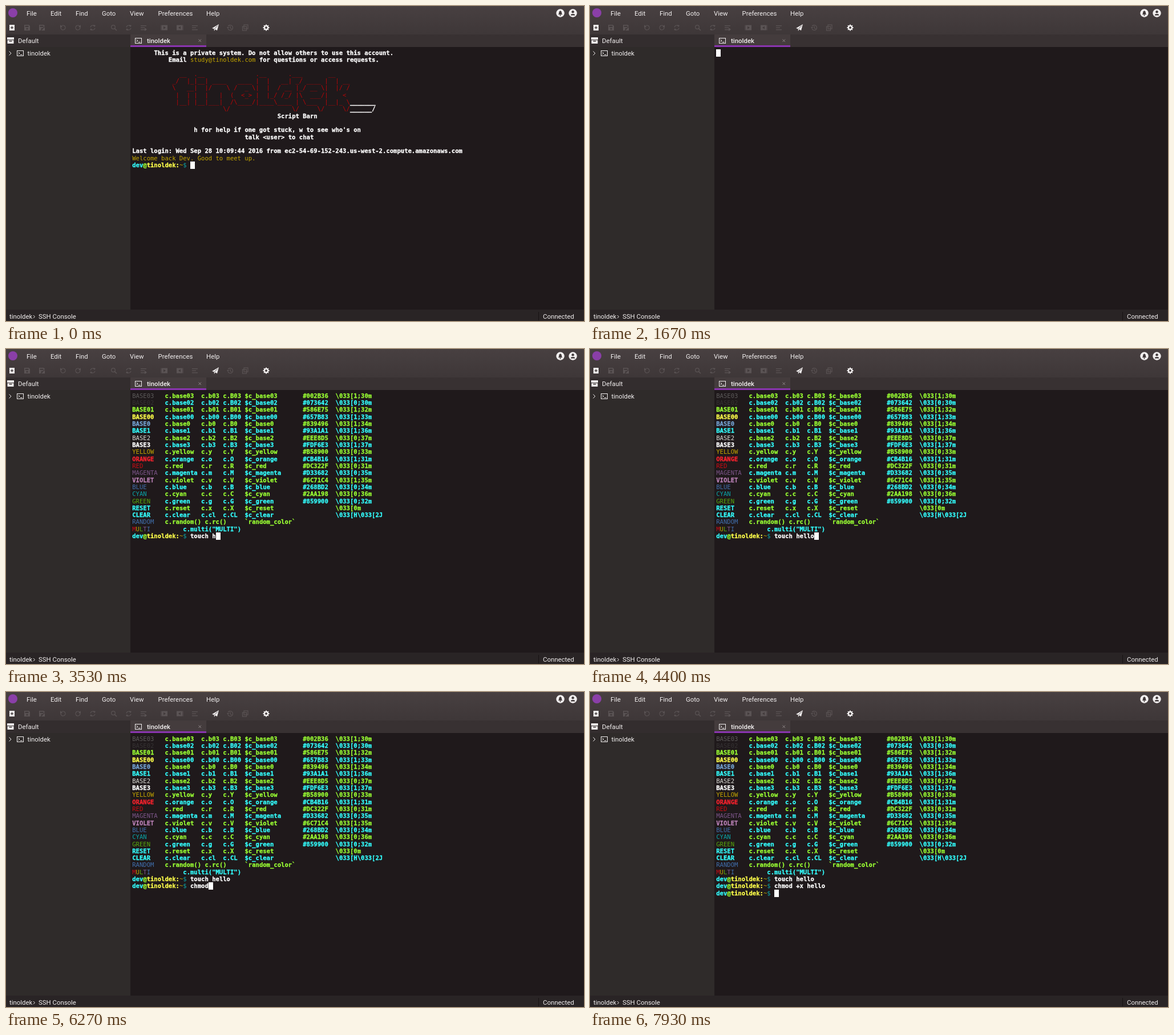
Recreate the animation shown at these times as an HTML page with a canvas. Size 1013 by 553 pixels, loop 8000 ms.

```html
<!DOCTYPE html>
<html lang="en">
<head>
<meta charset="utf-8">
<title>Terminal session</title>
<style>
html, body { margin: 0; width: 100%; height: 100%; overflow: hidden; background: #1f191b; }
canvas { display: block; width: 1013px; height: 553px; }
</style>
</head>
<body>
<canvas id="stage"></canvas>
<script>
const W = 1013, H = 553, LOOP = 8000;
const canvas = document.getElementById('stage');
const ctx = canvas.getContext('2d');
const ratio = window.devicePixelRatio || 1;
canvas.width = W * ratio;
canvas.height = H * ratio;

const HOST = 'tinoldek', USER = 'dev';
const LEFT = 221.2, TOP = 82, CELL = 6.363, LINE = 12.32;
const MONO = '10.57px "DejaVu Sans Mono", monospace';
const SANS = '11.4px Roboto, sans-serif';
const C = {
  white: '#ffffff', grey: '#dcdcd6', green: '#99ff33', cyan: '#33ffff', yellow: '#ffff4a',
  gold: '#c4a600', teal: '#0aa5a8', red: '#cc0c14', blue: '#4070ae', purple: '#7d568a', leaf: '#58a80c'
};
const LIT = '#f2efef', DIM = '#5a5354', BAR = '#413a3b';

// ---- basic drawing helpers

function rect(x, y, w, h, color) {
  ctx.fillStyle = color;
  ctx.fillRect(x, y, w, h);
}

function disc(x, y, r, color) {
  ctx.fillStyle = color;
  ctx.beginPath();
  ctx.arc(x, y, r, 0, Math.PI * 2);
  ctx.fill();
}

function arc(x, y, r, from, to, color, width = 1.2) {
  ctx.strokeStyle = color;
  ctx.lineWidth = width;
  ctx.beginPath();
  ctx.arc(x, y, r, from, to);
  ctx.stroke();
}

function line(points, color, width = 1.2) {
  ctx.strokeStyle = color;
  ctx.lineWidth = width;
  ctx.beginPath();
  for (let i = 0; i < points.length; i += 2) ctx.lineTo(points[i], points[i + 1]);
  ctx.stroke();
}

function poly(points, color) {
  ctx.fillStyle = color;
  ctx.beginPath();
  for (let i = 0; i < points.length; i += 2) ctx.lineTo(points[i], points[i + 1]);
  ctx.fill();
}

function label(text, x, y, weight = 400, color = LIT) {
  ctx.font = weight + ' ' + SANS;
  ctx.fillStyle = color;
  ctx.fillText(text, x, y);
}

function put(row, col, text, color = C.white, weight = 'bold') {
  const x = LEFT + col * CELL, y = TOP + row * LINE + 3.7;
  ctx.font = weight + ' ' + MONO;
  ctx.fillStyle = color;
  ctx.fillText(text, x, y);
  if (weight !== 'bold') return;
  ctx.strokeStyle = color;
  ctx.lineWidth = 0.3;
  ctx.strokeText(text, x, y);
}

const thin = (row, col, text, color) => put(row, col, text, color, 'normal');

function cursor(row, col) {
  rect(Math.round(LEFT + col * CELL), Math.round(TOP + row * LINE - 6.5), 8, 13, '#ffffff');
}

// ---- window frame

function shellIcon(x, y) {
  ctx.strokeStyle = LIT;
  ctx.lineWidth = 1;
  ctx.strokeRect(x + 0.5, y + 0.5, 11, 9);
  line([x + 2.5, y + 3, x + 5, y + 5, x + 2.5, y + 7], LIT, 1);
  line([x + 6, y + 7.5, x + 9.5, y + 7.5], LIT, 1);
}

function floppy(x) {
  poly([x - 5, 33, x + 3, 33, x + 5, 35, x + 5, 43, x - 5, 43], DIM);
  rect(x - 3.5, 34.5, 6, 2.5, BAR);
  disc(x, 40, 1.6, BAR);
}

function turn(x, dir) {
  arc(x, 38, 4, -2.4, 2.4, DIM);
  if (dir < 0) {
    arc(x, 38, 4, 2.4, 3.6, DIM);
    poly([x - 5, 33, x - 5, 37, x - 1, 37], DIM);
  } else {
    arc(x, 38, 4, 2, 4.4, DIM);
    poly([x + 5, 33, x + 5, 37, x + 1, 37], DIM);
  }
}

function sync(x) {
  arc(x, 38, 4, 3.3, 5.6, DIM);
  arc(x, 38, 4, 0.2, 2.5, DIM);
  poly([x + 1, 33, x + 5, 34, x + 3, 37], DIM);
  poly([x - 1, 43, x - 5, 42, x - 3, 39], DIM);
}

function indent(x, dir) {
  rect(x - 5, 33.5, 10, 9, DIM);
  poly([x - 2 * dir, 35.5, x + 2 * dir, 38, x - 2 * dir, 40.5], BAR);
  rect(x - dir * 6 - 0.5, 33.5, 1, 9, DIM);
}

function bars(x) {
  for (const [y, w] of [[34, 10], [37.5, 7], [41, 10]]) rect(x - 5, y, w, 1.3, DIM);
}

function gear(x, y) {
  for (let i = 0; i < 8; i++) {
    const a = i * Math.PI / 4;
    line([x, y, x + Math.cos(a) * 5.5, y + Math.sin(a) * 5.5], LIT, 2);
  }
  disc(x, y, 4.2, LIT);
  disc(x, y, 1.9, BAR);
}

function toolbar() {
  rect(6, 33, 9, 10, LIT);
  line([8, 38, 13, 38], BAR, 1.4);
  line([10.5, 35.5, 10.5, 40.5], BAR, 1.4);
  floppy(37);
  floppy(63);
  line([61, 43, 68, 36], BAR, 1.3);
  turn(100, -1);
  turn(126, 1);
  sync(152);
  arc(188, 37, 3.3, 0, 7, DIM);
  line([190.5, 39.5, 194, 43], DIM, 1.5);
  sync(215);
  bars(241);
  poly([243, 38, 247, 41, 243, 44], DIM);
  indent(278, 1);
  indent(304, -1);
  bars(331);
  poly([361, 39, 373, 32, 370, 43, 366.5, 41, 365, 44, 364.5, 40], LIT);
  line([365, 40.5, 371, 34.5], BAR, 0.9);
  arc(393, 38, 4.5, -2.6, 2.6, DIM);
  line([393, 35, 393, 38.5, 395.5, 40], DIM);
  poly([387, 37, 391, 37, 389, 40], DIM);
  ctx.strokeStyle = DIM;
  ctx.lineWidth = 1.2;
  ctx.strokeRect(417, 33, 7, 7);
  ctx.strokeRect(414.5, 36, 7, 7);
  gear(456, 38);
}

function chrome() {
  const bar = ctx.createLinearGradient(0, 0, 0, 50);
  bar.addColorStop(0, '#484041');
  bar.addColorStop(1, '#3e3738');
  rect(0, 0, W, 50, bar);
  rect(0, 50, 218, 483, '#2f2b2a');
  rect(0, 50, 218, 22, '#332d2e');
  rect(218, 50, W - 218, 22, '#383132');
  rect(218, 50, 133, 22, '#443c3d');
  rect(218, 69, 133, 3, '#8a35b0');
  rect(218, 72, W - 218, 461, '#1f191b');
  rect(0, 533, W, 20, '#292425');

  disc(12, 12, 8, '#8a3fa8');
  const menu = [['File', 36], ['Edit', 78], ['Find', 122], ['Goto', 168],
    ['View', 217], ['Preferences', 266.5], ['Help', 351]];
  for (const [text, x] of menu) label(text, x, 17);

  disc(971.5, 12.5, 7.2, LIT);
  poly([968, 15, 969, 13, 969.3, 10, 971.5, 8, 973.7, 10, 974, 13, 975, 15], BAR);
  disc(971.5, 16.4, 1.1, BAR);
  disc(993.5, 12.5, 7.2, LIT);
  disc(993.5, 10.3, 2.2, BAR);
  poly([989.5, 16.5, 991, 14, 996, 14, 997.5, 16.5], BAR);
  toolbar();

  rect(2, 55, 12, 4, LIT);
  rect(2.5, 60, 11, 6, LIT);
  rect(5.5, 61, 5, 1.4, '#332d2e');
  label('Default', 21, 64.5);
  line([5.5, 79.5, 9, 83, 5.5, 86.5], LIT, 1);
  shellIcon(19, 78);
  label(HOST, 37.5, 86.5);
  shellIcon(226, 56);
  label(HOST, 247, 64.5, 500);
  line([337.5, 58.5, 342, 63], '#8d8586', 1);
  line([342, 58.5, 337.5, 63], '#8d8586', 1);

  label(HOST, 6, 548.8);
  line([48, 543, 50.5, 545.5, 48, 548], LIT, 1);
  label('SSH Console', 57, 548.8);
  rect(933, 537, 1, 15, '#161213');
  label('Connected', 941, 548.8);
}

// ---- terminal contents

const BANNER = String.raw`
  __  .__              .__      .___       __
_/  |_|__| ____   ____ |  |   __| _/ ____ |  | __
\   __|  |/    \ /  _ \|  |  / __ |_/ __ \|  |/ /
 |  | |  |   |  (  <_> |  |_/ /_/ |\  ___/|    <
 |__| |__|___|  /\____/|____\____ | \___  |__|_ \
              \/                 \/     \/     \/`.split('\n').slice(1);

function welcome() {
  put(0, 6, 'This is a private system. Do not allow others to use this account.');
  put(1, 10, 'Email');
  thin(1, 16, 'study@' + HOST + '.com', C.gold);
  put(1, 35, 'for questions or access requests.');
  BANNER.forEach((text, i) => thin(3 + i, 11, text, '#b80508'));
  put(7, 60, '_______');
  put(8, 60, '______/');
  put(9, 40, 'Script Barn');
  put(11, 17, "h for help if one got stuck, w to see who's on");
  put(12, 31, 'talk <user> to chat');
  put(14, 0, 'Last login: Wed Sep 28 10:09:44 2016 from ec2-54-69-152-243.us-west-2.compute.amazonaws.com');
  thin(15, 0, 'Welcome back Dev. Good to meet up.', C.gold);
}

// name, short form, hex, escape code, label colour, bold label
const COLORS = [
  ['base03', 'b03', '#002B36', '1;30', '#5c5a5a', 0],
  ['base02', 'b02', '#073642', '0;30', '#363334', 0],
  ['base01', 'b01', '#586E75', '1;32', C.green, 1],
  ['base00', 'b00', '#657B83', '1;33', C.yellow, 1],
  ['base0', 'b0', '#839496', '1;34', '#729fcf', 1],
  ['base1', 'b1', '#93A1A1', '1;36', C.cyan, 1],
  ['base2', 'b2', '#EEE8D5', '0;37', C.grey, 0],
  ['base3', 'b3', '#FDF6E3', '1;37', C.white, 1],
  ['yellow', 'y', '#B58900', '0;33', C.gold, 0],
  ['orange', 'o', '#CB4B16', '1;31', '#f5222d', 1],
  ['red', 'r', '#DC322F', '0;31', C.red, 0],
  ['magenta', 'm', '#D33682', '0;35', C.purple, 0],
  ['violet', 'v', '#6C71C4', '1;35', '#b87fb4', 1],
  ['blue', 'b', '#268BD2', '0;34', C.blue, 0],
  ['cyan', 'c', '#2AA198', '0;36', C.teal, 0],
  ['green', 'g', '#859900', '0;32', C.leaf, 0],
  ['reset', 'x', '', '0', C.cyan, 1],
  ['clear', 'cl', '', '', C.cyan, 1]
];

function table() {
  COLORS.forEach(([name, short, hex, code, color, bold], row) => {
    const tint = row % 2 ? C.cyan : C.green;
    put(row, 0, name.toUpperCase(), color, bold ? 'bold' : 'normal');
    put(row, 9, 'c.' + name, tint);
    put(row, 19, 'c.' + short, tint);
    put(row, 25, 'c.' + short.toUpperCase(), tint);
    put(row, 31, '$c_' + name, tint);
    put(row, 47, hex, tint);
    put(row, 56, code ? '\\033[' + code + 'm' : '\\033[H\\033[2J', tint);
  });
  thin(18, 0, 'RANDOM', C.blue);
  put(18, 9, 'c.random()', C.green);
  put(18, 20, 'c.rc()', C.green);
  put(18, 31, '`random_color`', C.green);
  [C.red, C.gold, C.leaf, C.purple, C.blue].forEach((tint, i) => thin(19, i, 'MULTI'[i], tint));
  put(19, 14, 'c.multi("MULTI")', C.cyan);
}

const PROMPT = 16;

function prompt(row) {
  put(row, 0, USER, C.cyan);
  put(row, 3, '@', C.green);
  put(row, 4, HOST + ':', C.yellow);
  thin(row, 13, '~', C.gold);
  thin(row, 14, '$', C.teal);
}

// A command typed key by key, then entered.
function command(row, text, t, start, step, enter) {
  prompt(row);
  const count = Math.max(0, Math.min(text.length, Math.floor((t - start) / step) + 1));
  put(row, PROMPT, text.slice(0, count));
  if (t < enter) cursor(row, PROMPT + count);
  else cursor(row + 1, 0);
}

function terminal(t) {
  if (t < 1670) {
    welcome();
    command(16, 'colors', t, 400, 140, 1270);
    return;
  }
  if (t < 1795) {
    cursor(0, 0);
    return;
  }
  table();
  if (t < 4665) {
    command(20, 'touch hello', t, 2800, 115, 4600);
    return;
  }
  prompt(20);
  put(20, PROMPT, 'touch hello');
  if (t < 7925) {
    command(21, 'chmod +x hello', t, 5600, 150, 7865);
    return;
  }
  prompt(21);
  put(21, PROMPT, 'chmod +x hello');
  prompt(22);
  cursor(22, PROMPT);
}

const began = performance.now();

function draw() {
  ctx.setTransform(ratio, 0, 0, ratio, 0, 0);
  chrome();
  terminal((performance.now() - began) % LOOP);
  requestAnimationFrame(draw);
}
draw();
</script>
</body>
</html>
```
